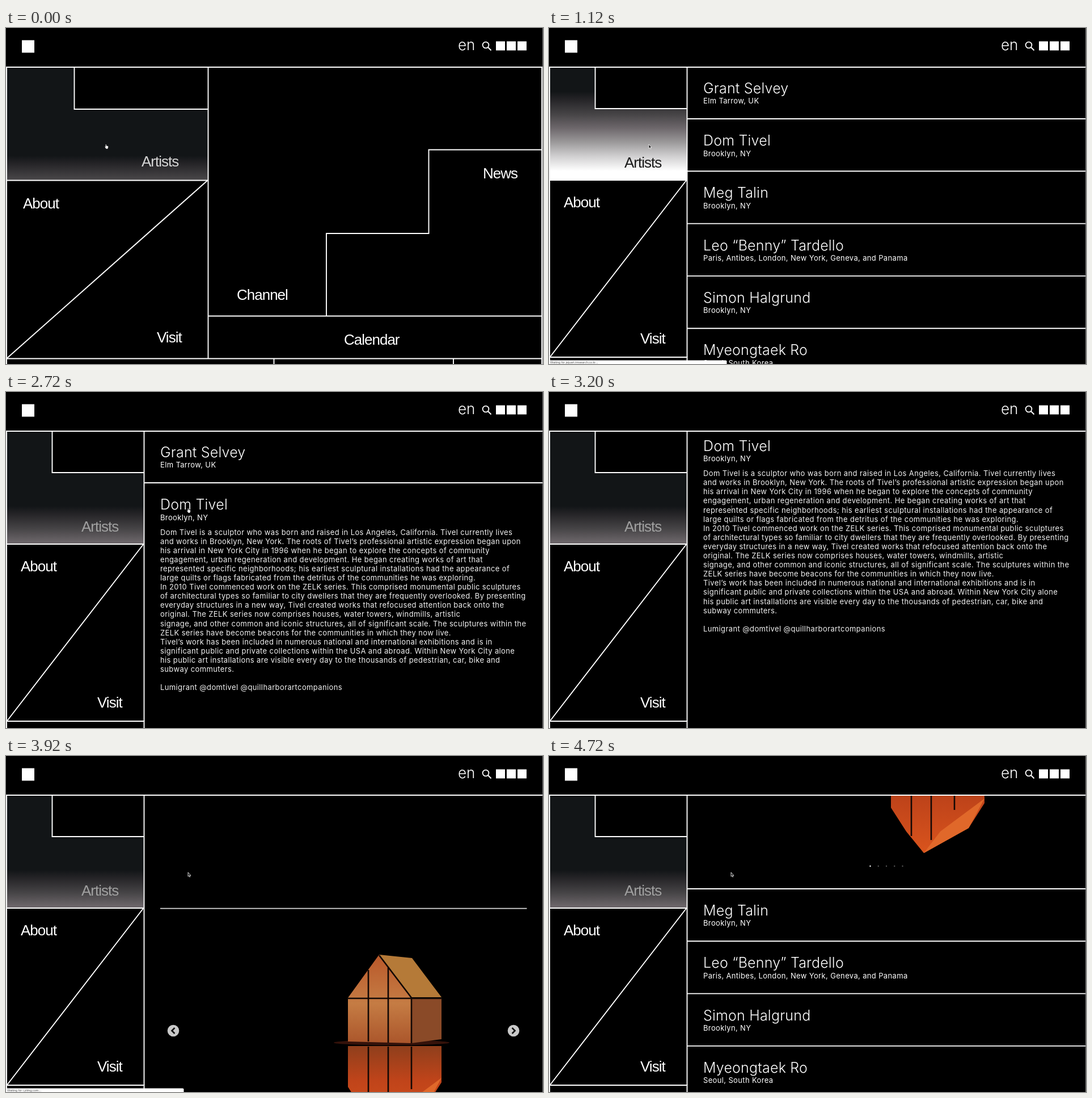
Animation, 947 px wide and 592 px high, one loop 4800 ms. Source, as an HTML page:

```html
<!DOCTYPE html>
<html lang="en">
<head>
<meta charset="utf-8">
<title>Artists</title>
<style>
  html, body { margin: 0; width: 100%; height: 100%; overflow: hidden; background: #000; }
  svg { display: block; width: 947px; height: 592px; }
  text { fill: #fff; white-space: pre; }
  .line { fill: none; stroke: #fff; stroke-width: 1.9; }
  .nav { font: 26px "Liberation Sans", Arial, sans-serif; letter-spacing: -1px; }
  .name { font: 350 25px Inter, sans-serif; letter-spacing: .2px; }
  .lang { font: 350 26px Inter, sans-serif; }
  .place { font: 13px Inter, sans-serif; letter-spacing: .35px; }
  .bio { font: 13px Inter, sans-serif; letter-spacing: .38px; fill: #f2f2f2; }
  .status { font: 5.5px "Liberation Sans", Arial, sans-serif; fill: #555; }
</style>
</head>
<body>
<svg id="stage" viewBox="0 0 947 592" xmlns="http://www.w3.org/2000/svg"></svg>
<script>
const LOOP = 4800, STEP = 80;
const CELL = 92.3, TOP = 67.7, OPEN = 943.7;

const people = [
  ["Grant Selvey", "Elm Tarrow, UK"],
  ["Dom Tivel", "Brooklyn, NY"],
  ["Meg Talin", "Brooklyn, NY"],
  ["Leo “Benny” Tardello", "Paris, Antibes, London, New York, Geneva, and Panama"],
  ["Simon Halgrund", "Brooklyn, NY"],
  ["Myeongtaek Ro", "Seoul, South Korea"]
];

const bio = `Dom Tivel is a sculptor who was born and raised in Los Angeles, California. Tivel currently lives
and works in Brooklyn, New York. The roots of Tivel’s professional artistic expression began upon
his arrival in New York City in 1996 when he began to explore the concepts of community
engagement, urban regeneration and development. He began creating works of art that
represented specific neighborhoods; his earliest sculptural installations had the appearance of
large quilts or flags fabricated from the detritus of the communities he was exploring.
In 2010 Tivel commenced work on the ZELK series. This comprised monumental public sculptures
of architectural types so familiar to city dwellers that they are frequently overlooked. By presenting
everyday structures in a new way, Tivel created works that refocused attention back onto the
original. The ZELK series now comprises houses, water towers, windmills, artistic
signage, and other common and iconic structures, all of significant scale. The sculptures within the
ZELK series have become beacons for the communities in which they now live.
Tivel’s work has been included in numerous national and international exhibitions and is in
significant public and private collections within the USA and abroad. Within New York City alone
his public art installations are visible every day to the thousands of pedestrian, car, bike and
subway commuters.

Lumigrant @domtivel @quillharborartcompanions`.split("\n");

const text = (cls, x, y, s) => `<text class="${cls}" x="${x}" y="${y}">${s}</text>`;
const line = d => `<path class="line" d="${d}"/>`;
const shape = (d, fill) => `<path d="${d}" fill="${fill}"/>`;
const square = (x, y, s) => `<rect x="${x}" y="${y}" width="${s}" height="${s}" fill="#fff"/>`;

// Left menu: w = right edge, n = notch edge, b = bottom
const menu = (w, n, ny, y, b) =>
  shape(`M2 70H${n}V${ny}H${w}V${y}H2Z`, "url(#glow)") +
  line(`M${n} 69V${ny}H${w}M1 ${y}H${w}M1.5 ${b}L${w - 1} ${y}M${w} 69V${b}`);

const person = ([name, place], i) => {
  const y = TOP + CELL * i;
  return line(`M244 ${y}H946`) + text("name", 272, y + 47, name) + text("place", 272, y + 65.5, place);
};

const arrow = (x, dir) =>
  `<circle cx="${x}" cy="954" r="10.3" fill="#c9c9c9"/>` +
  `<path d="M${x - 2.5 * dir} 949l${5 * dir} 5l${-5 * dir} 5" fill="none" stroke="#111" stroke-width="2.6"/>`;

const house = `<g transform="translate(0 665)">` +
  `<ellipse cx="680" cy="310" rx="102" ry="4.5" fill="#35120a"/>` +
  shape("M603 231L658 155L715 231V311L603 308Z", "url(#wall)") +
  shape("M658 155L716 161L768 230H715Z", "#b57a38") +
  shape("M715 233H768V304L715 311Z", "#8a4a28") +
  shape("M603 316H768V380L740 424L661 468L630 430L603 388Z", "url(#mirror)") +
  shape("M768 372L740 424L661 468L690 430Z", "#e0682a") +
  `<path d="M602 232H769M639 182V308M674 176V310M715 231V311M658 156L715 231M639 317V438M674 317V445M715 317V392" ` +
  `fill="none" stroke="#120805" stroke-width="2.6"/></g>`;

const dots = [0, 1, 2, 3, 4].map(i =>
  `<circle cx="${566.5 + i * 14.25}" cy="1156" r="1.2" fill="${i ? "#555" : "#fff"}"/>`).join("");

const stops = (...list) => list.map(([o, c]) => `<stop offset="${o}" stop-color="${c}"/>`).join("");

stage.innerHTML = `
<defs>
  <linearGradient id="glow" gradientUnits="userSpaceOnUse" x1="0" x2="0">
    ${stops([0, "#121517"], [.1, "#252427"], [.29, "#474547"], [.46, "#6d676b"], [.64, "#9c9a9b"], [.82, "#d2d1d2"], [1, "#fff"])}
  </linearGradient>
  <linearGradient id="wall" x1="0" y1="0" x2="0" y2="1">
    ${stops([0, "#b9582a"], [.55, "#c57c44"], [1, "#ab562b"])}
  </linearGradient>
  <linearGradient id="mirror" x1="0" y1="0" x2="0" y2="1">
    ${stops([0, "#8f3f1c"], [.4, "#c0441a"], [1, "#d9541d"])}
  </linearGradient>
  <clipPath id="pane"><rect x="242" y="70" width="705" height="522"/></clipPath>
  <clipPath id="fold"><rect id="foldBox" x="244" y="236" width="703" height="0"/></clipPath>
</defs>
<rect width="947" height="592"/>
<g id="home">
  ${menu(356.5, 120.5, 143, 268.5, 582)}
  ${line("M357 507.5H945M565 507V362H745.5V214.5H945M1 582.5H946M472.5 582V592M789 582V592M945 69V592")}
  ${text("nav artists", 239, 244, "Artists")}
  ${text("nav", 30, 318, "About")}
  ${text("nav", 266, 554, "Visit")}
  ${text("nav", 407, 478.5, "Channel")}
  ${text("nav", 841, 264.5, "News")}
  ${text("nav", 596, 557.5, "Calendar")}
</g>
<g id="page">
  <g clip-path="url(#pane)"><g id="scroller">
    ${people.slice(0, 2).map(person).join("")}
    <g id="detail" clip-path="url(#fold)">
      ${bio.map((s, i) => text("bio", 272, 251.5 + i * 16.1, s)).join("")}
      <path d="M272 738.6H918.5" stroke="#d8d8d8" stroke-width="1.6"/>
      ${house}${arrow(295, -1)}${arrow(895, 1)}${dots}
    </g>
    <g id="rest">${people.slice(2).map((p, i) => person(p, i + 2)).join("")}</g>
  </g></g>
  ${menu(243.5, 81.5, 142, 268, 580)}
  ${line("M1 580H243.5V592")}
  ${text("nav artists", 133, 245.5, "Artists")}
  ${text("nav", 26, 315.5, "About")}
  ${text("nav", 161, 556, "Visit")}
</g>
${line("M0 69H946M1 69V592")}
<path d="M946.5 0V592" stroke="#777"/>
${square(28, 21.5, 22)}
${text("lang", 797, 39, "en")}
<circle cx="846" cy="30" r="5.4" class="line" style="stroke-width:1.8"/>
${line("M850 34L855.5 39.5")}
${square(864, 23.5, 16)}${square(883, 23.5, 16)}${square(902, 23.5, 16)}
<g id="bar">
  <path d="M0 585.6H311.5Q313.5 585.6 313.5 587.6V592H0Z" fill="#fff"/>
  <text id="barText" class="status" x="2" y="591"></text>
</g>
<g id="cursor">
  <path id="hand" d="M-1.5 -4V0L-3 -1L-2 2L-.5 4H2.5L3.5 0L2 -1.5L0 -1.5V-4Z" fill="#fff" stroke="#222" stroke-width=".5"/>
  <path id="pointer" d="M-1 -4V3.2L.6 1.9L1.8 4.2L2.8 3.7L1.8 1.5H3.9Z" fill="#111" stroke="#fff" stroke-width=".8"/>
  <path id="beam" d="M-1.5 -8H1.5M0 -8V0M-1.5 0H1.5" stroke="#777" stroke-width=".9"/>
</g>`;

const el = {};
for (const id of ["home", "page", "scroller", "detail", "rest", "foldBox", "glow", "bar", "barText", "cursor", "hand", "pointer", "beam"])
  el[id] = document.getElementById(id);
const labels = document.querySelectorAll(".artists");

const linear = k => k;
const swing = k => .5 - Math.cos(k * Math.PI) / 2;

// Value at time t on a list of [time, value] points
function track(t, points, ease = linear) {
  if (t <= points[0][0]) return points[0][1];
  for (let i = 1; i < points.length; i++) {
    const [a, from] = points[i - 1], [b, to] = points[i];
    if (t <= b) return from + (to - from) * ease((t - a) / (b - a));
  }
  return points[points.length - 1][1];
}

const show = (node, on) => node.setAttribute("display", on ? "inline" : "none");
const within = (t, a, b) => t >= a && t < b;

function cursorKind(t, y) {
  if (t < 800) return "hand";
  if (t < 1520) return "pointer";
  if (y < 30) return "hand";
  if (y < 320) return "beam";
  if (y < 530) return "pointer";
  return y < 880 ? "hand" : "pointer";
}

function draw(t) {
  show(el.home, t < 800);
  show(el.page, t >= 800);

  const glowY = track(t, [[0, 225], [480, 112], [1360, 112], [1840, 201]], swing);
  el.glow.setAttribute("y1", glowY);
  el.glow.setAttribute("y2", glowY + 140);
  const grey = Math.round(track(t, [[0, 213], [480, 26], [1360, 26], [1840, 160]], swing));
  labels.forEach(n => n.style.fill = `rgb(${grey},${grey},${grey})`);

  const open = track(t, [[2320, 0], [2720, OPEN]], swing);
  show(el.detail, open > 0);
  el.foldBox.setAttribute("height", open);
  el.rest.setAttribute("transform", `translate(0 ${open})`);

  const y = track(t, [[2800, 0], [3040, 30], [3280, 140], [3360, 196], [3600, 277],
    [3920, 470], [4240, 665], [4480, 830], [4720, 962]]);
  el.scroller.setAttribute("transform", `translate(0 ${-y})`);

  const first = within(t, 880, 1840);
  show(el.bar, first || within(t, 3520, 4080));
  el.barText.textContent = `Waiting for ${first ? "jejuart.tmsearch.co.kr" : "i.ytimg.com"}...`;

  const x = track(t, [[0, 177], [1200, 177], [1680, 320], [2240, 320], [2480, 322]], swing);
  el.cursor.setAttribute("transform", `translate(${x} 209)`);
  const kind = cursorKind(t, y);
  for (const k of ["hand", "pointer", "beam"]) show(el[k], k === kind);
}

const start = performance.now();
function tick() {
  const t = (performance.now() - start) % LOOP;
  draw(Math.floor(t / STEP) * STEP);
  requestAnimationFrame(tick);
}
tick();
</script>
</body>
</html>
```
